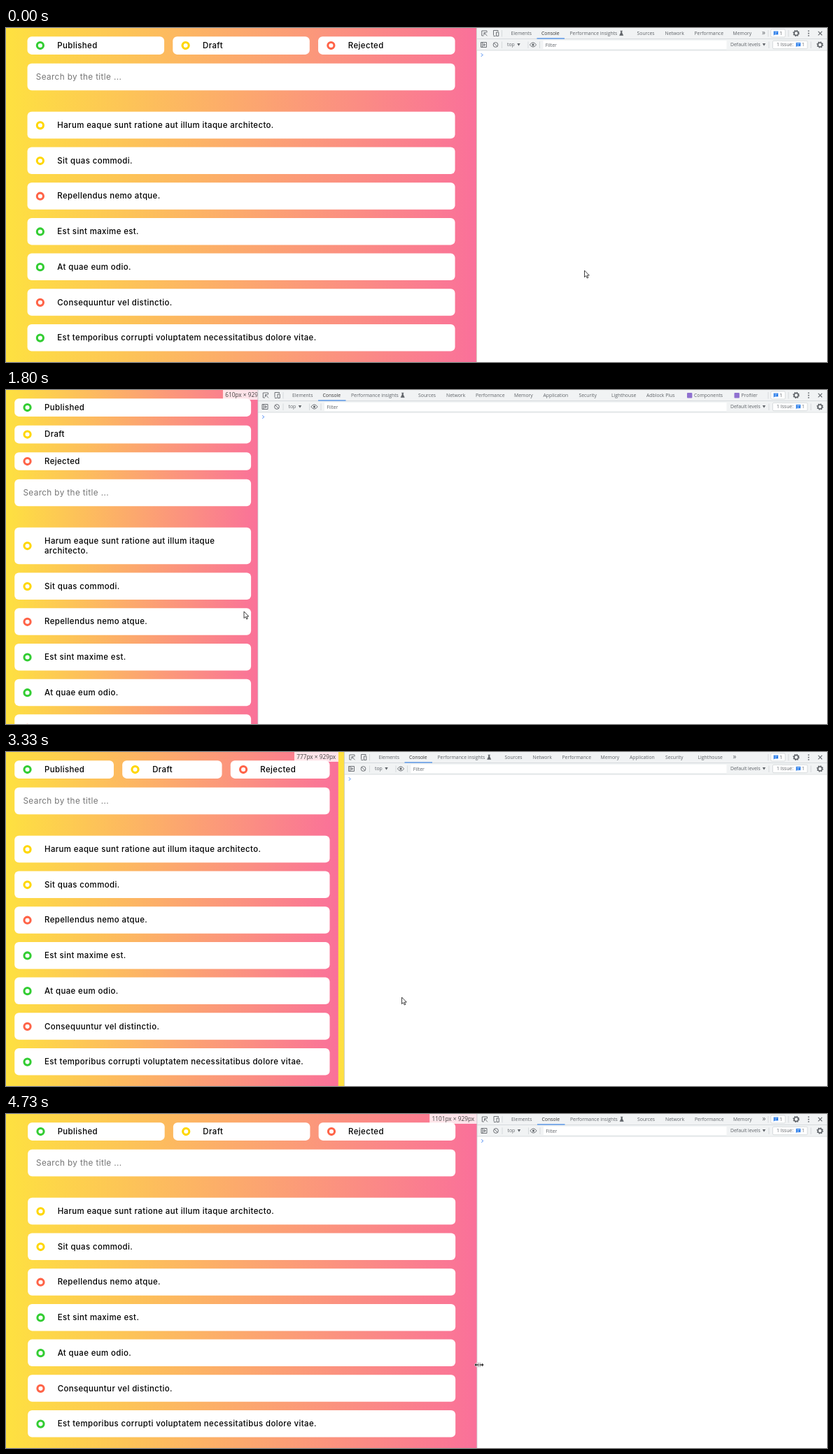
Write an HTML page that moves like this. It is 1173x478 px and loops after 5.59 s.

```html
<!DOCTYPE html>
<html lang="en">
<head>
<meta charset="utf-8">
<title>Responsive list</title>
<style>
html, body { margin: 0; width: 100%; height: 100%; overflow: hidden; background: #fff; }
#stage { position: relative; width: 1173px; height: 478px; overflow: hidden; background: #fff; }
#view { position: absolute; left: 0; top: 0; height: 478px; overflow: hidden; }
#paint { position: absolute; inset: 0; background: linear-gradient(90deg, #fee140, #fa709a) repeat-x; }
#page {
  position: absolute; left: 0; top: 0; transform: scale(.611); transform-origin: 0 0;
  font: 500 18.72px/23px Inter, "Open Sans", sans-serif; letter-spacing: .034em; color: #000;
}
main { max-width: 1000px; margin: 0 auto; padding: 20px; }
.filters, .list { display: grid; gap: 20px; }
.filters { grid-template-columns: repeat(3, 1fr); row-gap: 21px; }
.narrow .filters { grid-template-columns: 1fr; }
.card { display: flex; align-items: center; gap: 30px; padding: 20px 15px 20px 20px; background: #fff; border-radius: 10px; }
.filters .card { padding: 10px 20px; line-height: 22px; }
.search { margin: 21px 0 50px; font-size: 19.2px; font-weight: 400; color: #757575; }
.ring { flex: none; box-sizing: border-box; width: 20px; height: 20px; border: 5.5px solid; border-radius: 50%; }
#bar { position: absolute; top: 0; width: 10.4px; height: 478px; background: #f1f1f1; }
#bar::after { content: ""; position: absolute; left: 1.2px; right: 1.2px; top: 10.4px; bottom: 0; background: #c1c1c1; }
#size {
  position: absolute; top: 0; height: 14px; padding: 0 3.5px; white-space: nowrap; transform: translateX(-100%);
  background: rgba(255, 255, 255, .8); color: #444; font: 8.3px/14.5px "Open Sans", sans-serif;
}
svg { position: absolute; left: 0; top: 0; }
svg text { font: 6.85px "Open Sans", sans-serif; fill: #5f6368; }
.line { fill: none; stroke: #5f6368; stroke-width: .9; }
</style>
</head>
<body>
<div id="stage">
  <div id="view">
    <div id="paint"></div>
    <div id="page"><main>
      <div class="filters"></div>
      <div class="card search">Search by the title ...</div>
      <div class="list"></div>
    </main></div>
    <div id="bar"></div>
    <div id="size"></div>
  </div>
  <svg width="1173" height="478" viewBox="0 0 1173 478">
    <defs>
      <g id="gear">
        <circle r="3" class="line" style="stroke-width:1.6"/>
        <circle r="4" class="line" style="stroke-width:1.4" stroke-dasharray="1.57 1.57"/>
      </g>
      <path id="bubble" d="M-3.5-3H3.5V2.5H-1.8L-3.5 4ZM-2-1.3H2M-2 .6H1" fill="#1a73e8" stroke="#fff" stroke-width=".6"/>
      <path id="down" d="M-2.2-1.8H2.2L0 2Z" fill="#5f6368"/>
    </defs>
    <g id="panel">
      <rect width="1173" height="478" fill="#fff"/>
      <rect width="1173" height="32" fill="#f1f3f4"/>
      <path d="M0 15.6H1173M0 32H1173" stroke="#cbced2" stroke-width=".7"/>
      <path d="M-.1 0V478" stroke="#c4c7cb" stroke-width=".8"/>
      <path class="line" d="M10 11H7.3V4H14.5V6.5M10.5 6.8L15 11.3M10.5 10V6.8H13.8"/>
      <path class="line" d="M24 10.5V3.5H30.5V5M24 11.5H27M28 6H31.3V11.5H28Z"/>
      <path d="M36 3V12.5M36 19.5V29M73.5 19.5V29M90 19.5V29" stroke="#cbced2" stroke-width=".7"/>
      <path d="M86 15H125.5" stroke="#1a73e8" stroke-width="1.2"/>
      <g id="tabs"></g>
      <text id="more" y="10.2" style="font-size:10px">»</text>
      <path class="line" d="M6 20.5H14V27.5H6ZM8 20.5V27.5M10 22.3L12.4 24 10 25.7Z"/>
      <g class="line"><circle cx="27" cy="24" r="3.4"/><path d="M24.6 21.6L29.4 26.4"/></g>
      <text x="43.5" y="26.4">top</text>
      <use href="#down" x="60" y="23.8"/>
      <path class="line" d="M75.8 24Q80.5 17.8 85.2 24Q80.5 30.2 75.8 24Z"/>
      <circle cx="80.5" cy="24" r="1.6" fill="#5f6368"/>
      <rect x="95" y="18" width="1078" height="12" fill="#fff"/>
      <text x="98.3" y="26.7">Filter</text>
      <path d="M6.4 36.4L8.6 38.6 6.4 40.8" fill="none" stroke="#367cf1" stroke-width="1"/>
    </g>
    <g>
      <rect x="1029.5" y="16.2" width="144" height="15.3" fill="#f1f3f4"/>
      <rect x="1092.8" y="2" width="20.5" height="11" rx="1.5" fill="#fff" stroke="#cbced2" stroke-width=".7"/>
      <use href="#bubble" x="1100" y="7.3"/>
      <text x="1105.3" y="10.1">1</text>
      <path d="M1089 3V12.5M1118 3V12.5M1090 19.5V29M1150 19.5V29" stroke="#cbced2" stroke-width=".7"/>
      <use href="#gear" x="1129" y="7.5"/>
      <path d="M1146.7 3.4V11.8" stroke="#5f6368" stroke-width="1.7" stroke-dasharray="1.7"/>
      <path class="line" d="M1160.5 4.8L1166 10.3M1166 4.8L1160.5 10.3" style="stroke-width:1.1"/>
      <text x="1035" y="26.4">Default levels</text>
      <use href="#down" x="1083" y="23.8"/>
      <rect x="1095.5" y="18.3" width="49.5" height="11.4" rx="1.5" fill="#fff" stroke="#cbced2" stroke-width=".7"/>
      <text x="1101" y="26.4">1 Issue:</text>
      <use href="#bubble" x="1132" y="23.8"/>
      <text x="1137" y="26.4">1</text>
      <use href="#gear" x="1163" y="24"/>
    </g>
    <path id="arrow" d="M0 0V9.6L2.2 7.5 3.8 11 5.3 10.3 3.8 7H6.8Z" fill="#fff" stroke="#111" stroke-width=".8"/>
    <g id="resize">
      <path d="M-7 0L-3.8-3V-1H3.8V-3L7 0 3.8 3V1H-3.8V3Z" fill="#333" stroke="#fff" stroke-width=".6"/>
      <path d="M-1.1-3.2V3.2M1.1-3.2V3.2" stroke="#444" stroke-width=".8"/>
      <path d="M0-3V3" stroke="#fff" stroke-width="1"/>
    </g>
  </svg>
</div>
<script>
const LOOP = 5590, TICK = 1000 / 15, SCALE = 0.611;
const VIEW_HEIGHT = 929, BREAKPOINT = 768, SCROLLBAR = 17, TAB_LIMIT = 1075;
const $ = id => document.getElementById(id);
const GREEN = '#32cd32', GOLD = '#ffd700', RED = '#ff6347';

const card = ([color, text]) =>
  `<div class="card"><span class="ring" style="border-color:${color}"></span><span>${text}</span></div>`;
document.querySelector('.filters').innerHTML =
  [[GREEN, 'Published'], [GOLD, 'Draft'], [RED, 'Rejected']].map(card).join('');
document.querySelector('.list').innerHTML = [
  [GOLD, 'Harum eaque sunt ratione aut illum itaque architecto.'],
  [GOLD, 'Sit quas commodi.'],
  [RED, 'Repellendus nemo atque.'],
  [GREEN, 'Est sint maxime est.'],
  [GREEN, 'At quae eum odio.'],
  [RED, 'Consequuntur vel distinctio.'],
  [GREEN, 'Est temporibus corrupti voluptatem necessitatibus dolore vitae.'],
].map(card).join('');

// name, left edge, right edge (relative to the panel)
const tabs = [
  ['Elements', 49, 79], ['Console', 92.5, 119], ['Performance insights', 133, 210],
  ['Sources', 229, 255], ['Network', 269, 297], ['Performance', 311, 352],
  ['Memory', 366, 394], ['Application', 407.5, 445], ['Security', 458.5, 485],
  ['Lighthouse', 505, 541], ['Adblock Plus', 555, 597], ['Components', 613, 665],
  ['Profiler', 680.5, 714],
];
$('tabs').innerHTML = tabs.map(([name, x]) => {
  const plugin = name === 'Components' || name === 'Profiler';
  const square = plugin ? `<rect x="${x}" y="4" width="7.4" height="7.4" rx="1" fill="#8f70d0"/>` : '';
  const flask = name === 'Performance insights'
    ? '<path d="M205 4.2H208.4M206 4.2V6.8L204.2 10.6H209.2L207.4 6.8V4.2" fill="#5f6368" stroke="#5f6368" stroke-width=".7"/>' : '';
  const tint = name === 'Console' ? ' style="fill:#333"' : '';
  return `<g>${square}<text x="${plugin ? x + 10 : x}" y="10"${tint}>${name}</text>${flask}</g>`;
}).join('');
const tabNodes = [...$('tabs').children];

// tick, panel x, viewport width in page px, pointer x, pointer y
const keys = [
  [0, 672.5, 1100, 826.5, 347], [3, 672.5, 1100, 752, 322], [7, 672.5, 1100, 668, 303],
  [12, 672.5, 1100, 668, 303], [14, 665.5, 1096, 655, 303], [15, 665.5, 1096, 655, 303],
  [17, 590, 1030, 545, 306], [18, 590, 1030, 545, 306], [19, 525.5, 942, 468.5, 309],
  [27, 360, 610, 340, 317], [33, 259.7, 431, 256, 320.5], [34, 259.7, 431, 256, 320.5],
  [36, 251, 414, 248, 322], [43, 229, 370, 227, 326], [45, 244.8, 373, 348, 328],
  [50, 483.5, 777, 565.5, 351], [51, 483.5, 777, 565.5, 351], [53, 553, 890, 625, 354],
  [54, 553, 890, 625, 354], [56, 666.5, 1076, 671.5, 358], [62, 675, 1104, 677, 359],
  [65, 675, 1104, 677, 359], [71, 673, 1101, 676, 359],
];

function pose(tick) {
  const next = keys.findIndex(k => k[0] > tick);
  if (next < 0) return keys[keys.length - 1];
  const a = keys[next - 1], b = keys[next];
  const u = (tick - a[0]) / (b[0] - a[0]);
  return a.map((v, i) => v + (b[i] - v) * u);
}

function layoutPage(width) {
  const page = $('page');
  page.className = width <= BREAKPOINT ? 'narrow' : '';
  page.style.width = width + 'px';
  const scrolls = page.offsetHeight > VIEW_HEIGHT;
  const content = scrolls ? width - SCROLLBAR : width;
  page.style.width = content + 'px';
  const edge = content * SCALE;
  $('paint').style.backgroundSize = `${edge}px 100%`;
  $('paint').style.right = scrolls ? 'auto' : '0';
  $('paint').style.width = scrolls ? edge + 'px' : 'auto';
  $('bar').style.display = scrolls ? '' : 'none';
  $('bar').style.left = edge + 'px';
}

function layoutTabs(x) {
  let shown = tabs.findIndex(tab => x + tab[2] > TAB_LIMIT);
  const overflow = shown >= 0;
  if (!overflow) shown = tabs.length;
  tabNodes.forEach((node, i) => node.style.display = i < shown ? '' : 'none');
  $('more').style.display = overflow ? '' : 'none';
  if (overflow) $('more').setAttribute('x', tabs[shown][1]);
}

function render(time) {
  const tick = Math.floor((time % LOOP + 4) / TICK);
  const [, x, rawWidth, px, py] = pose(tick);
  const width = Math.round(rawWidth);
  $('view').style.width = x + 'px';
  layoutPage(width);
  layoutTabs(x);
  $('size').style.display = tick >= 13 ? '' : 'none';
  $('size').style.left = width * SCALE + 'px';
  $('size').textContent = `${width}px × ${VIEW_HEIGHT}px`;
  $('panel').setAttribute('transform', `translate(${x})`);
  const resizing = (tick >= 7 && tick < 14) || tick >= 59;
  $('arrow').style.display = resizing ? 'none' : '';
  $('resize').style.display = resizing ? '' : 'none';
  $(resizing ? 'resize' : 'arrow').setAttribute('transform', `translate(${px} ${py})`);
}

function loop() {
  render(performance.now());
  requestAnimationFrame(loop);
}
loop();
</script>
</body>
</html>
```
